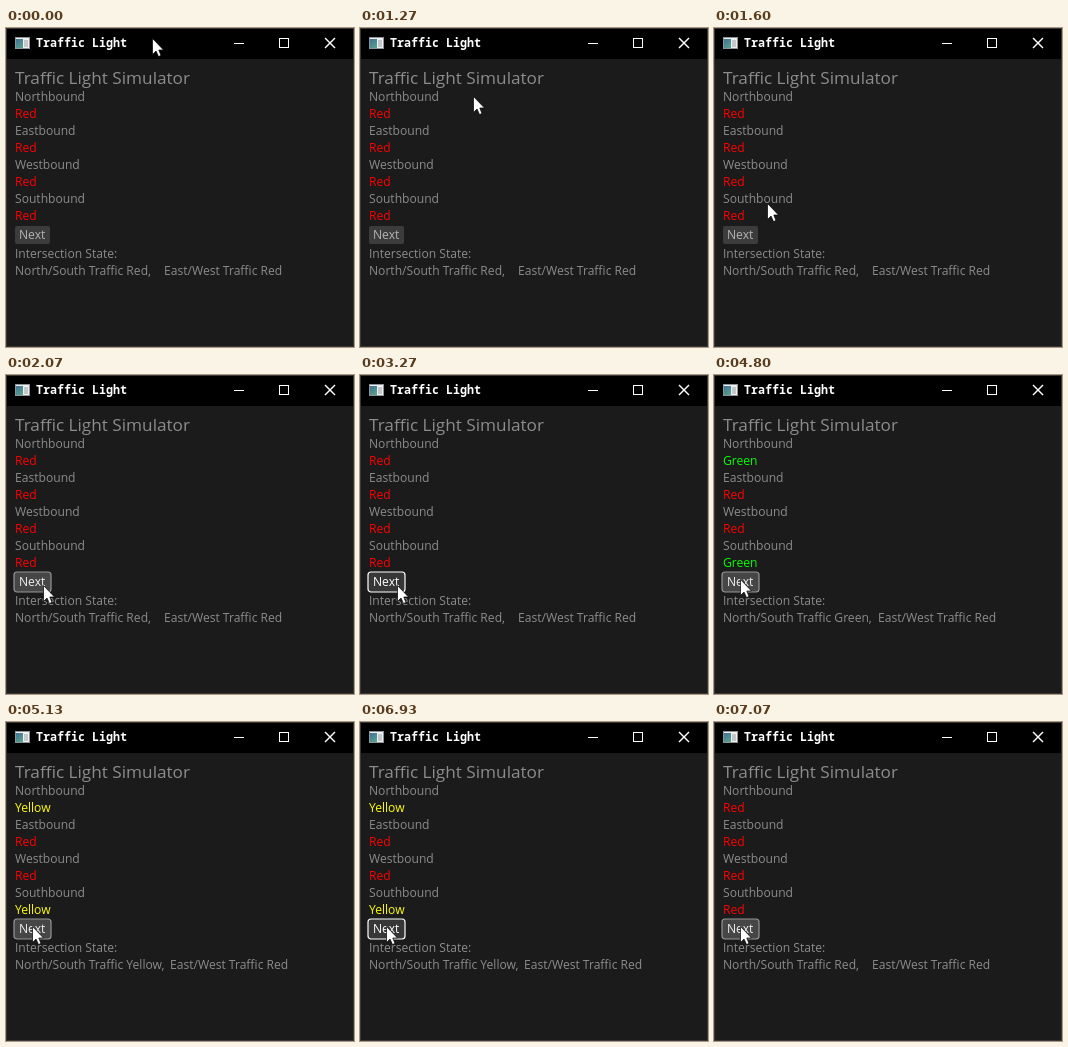
Recreate the animation shown at these times as an HTML page with a canvas. Size 348 by 319 pixels, loop 8 s.

```html
<!DOCTYPE html>
<html lang="en">
<head>
<meta charset="utf-8">
<title>Traffic Light</title>
<style>
  html, body { margin: 0; width: 100%; height: 100%; overflow: hidden; background: #1b1b1b; }
  canvas { display: block; }
</style>
</head>
<body>
<canvas id="stage" width="348" height="319"></canvas>
<script>
const ctx = document.getElementById('stage').getContext('2d');
const LOOP = 8000;
const TICK = 1000 / 15;
const LEFT = 9;
const ROW = 17;
const SANS = '"Open Sans", "Noto Sans", sans-serif';
const BODY = `400 12.1px ${SANS}`;
const HEADING = `400 17.2px ${SANS}`;
const TITLE = '600 11.67px "Noto Sans Mono", "DejaVu Sans Mono", monospace';
const GRAY = '#8c8c8c';
const COLORS = { Red: '#ff0000', Green: '#00ff00', Yellow: '#ffff00' };
const CYCLE = Object.keys(COLORS);

// Times are in ticks.
const HOME = { x: 146, y: 10 };
const MOVES = [
  { start: 17, end: 28, x: 33, y: 211 },
  { start: 30, end: 31, x: 37, y: 210 },
  { start: 59, end: 62, x: 44, y: 201 },
  { start: 66, end: 72, x: 26, y: 204 }
];
const CLICKS = [{ down: 49, up: 51 }, { down: 76, up: 77 }, { down: 104, up: 106 }];
const ARROW = new Path2D('M.5 .5V16.5L4 13L6.5 18.5L9 17.5L6.8 12H11.5Z');

const easeOut = k => 1 - (1 - k) ** 1.7;

function pointerAt(tick) {
  let { x, y } = HOME;
  for (const move of MOVES) {
    const k = Math.min(1, Math.max(0, (tick - move.start) / (move.end - move.start)));
    x += (move.x - x) * easeOut(k);
    y += (move.y - y) * easeOut(k);
  }
  return { x: Math.round(x), y: Math.round(y) };
}

function text(str, x, y, color = GRAY, font = BODY) {
  ctx.font = font;
  ctx.fillStyle = color;
  ctx.fillText(str, x, y);
}

function rect(x, y, w, h, fill) {
  ctx.fillStyle = fill;
  ctx.fillRect(x, y, w, h);
}

function line(x1, y1, x2, y2) {
  ctx.beginPath();
  ctx.moveTo(x1, y1);
  ctx.lineTo(x2, y2);
  ctx.stroke();
}

function drawIcon() {
  rect(9, 9, 15, 12, '#8d9499');
  rect(10, 10, 13, 10, '#f0f0f0');
  const pane = ctx.createLinearGradient(10, 11, 17, 20);
  pane.addColorStop(0, '#41719a');
  pane.addColorStop(1, '#5aa58c');
  rect(10, 11, 7, 9, pane);
  rect(18, 12, 4, 7, '#c4c8cb');
}

function drawWindow() {
  rect(0, 0, 348, 319, '#1b1b1b');
  rect(0, 0, 348, 31, '#000');
  ctx.lineWidth = 1;
  ctx.strokeStyle = '#383838';
  ctx.strokeRect(0.5, 0.5, 347, 318);
  drawIcon();
  text('Traffic Light', 30, 19, '#fff', TITLE);

  ctx.strokeStyle = '#fff';
  line(228, 15.5, 238, 15.5);
  ctx.strokeRect(273.5, 10.5, 9, 9);
  ctx.lineWidth = 1.4;
  line(319, 10, 329, 20);
  line(329, 10, 319, 20);
}

function drawButton(hover, pressed) {
  const grow = hover ? 1 : 0;
  ctx.beginPath();
  ctx.roundRect(LEFT - grow, 198 - grow, 35 + 2 * grow, 18 + 2 * grow, 2 + grow);
  ctx.fillStyle = pressed ? '#373737' : hover ? '#464646' : '#3c3c3c';
  ctx.fill();
  if (hover) {
    ctx.lineWidth = 1.2;
    ctx.strokeStyle = pressed ? '#fff' : '#969696';
    ctx.stroke();
  }
  text('Next', LEFT + 4, 211, pressed ? '#fff' : hover ? '#f0f0f0' : '#b4b4b4');
}

function drawPointer({ x, y }) {
  ctx.save();
  ctx.translate(x, y);
  ctx.fillStyle = '#fff';
  ctx.fill(ARROW);
  ctx.lineWidth = 0.7;
  ctx.strokeStyle = '#000';
  ctx.stroke(ARROW);
  ctx.restore();
}

function draw(now) {
  const tick = Math.floor((now % LOOP + 4) / TICK);
  const pointer = pointerAt(tick);
  const hover = pointer.x <= 45 && pointer.y >= 197 && pointer.y <= 217;
  const pressed = CLICKS.some(({ down, up }) => tick >= down && tick < up);
  const clicks = CLICKS.filter(({ up }) => tick >= up).length;
  const light = CYCLE[clicks % CYCLE.length];

  drawWindow();
  text('Traffic Light Simulator', LEFT, 56, GRAY, HEADING);
  ['North', 'East', 'West', 'South'].forEach((side, i) => {
    const state = side.endsWith('th') ? light : 'Red';
    const y = 73 + 2 * ROW * i;
    text(`${side}bound`, LEFT, y);
    text(state, LEFT, y + ROW, COLORS[state]);
  });
  drawButton(hover, pressed);
  text('Intersection State:', LEFT, 230);
  text(`North/South Traffic ${light},`, LEFT, 230 + ROW);
  text('East/West Traffic Red', light === 'Red' ? 158 : 164, 230 + ROW);
  drawPointer(pointer);
}

const start = performance.now();
function loop() {
  draw(performance.now() - start);
  requestAnimationFrame(loop);
}
loop();
</script>
</body>
</html>
```
